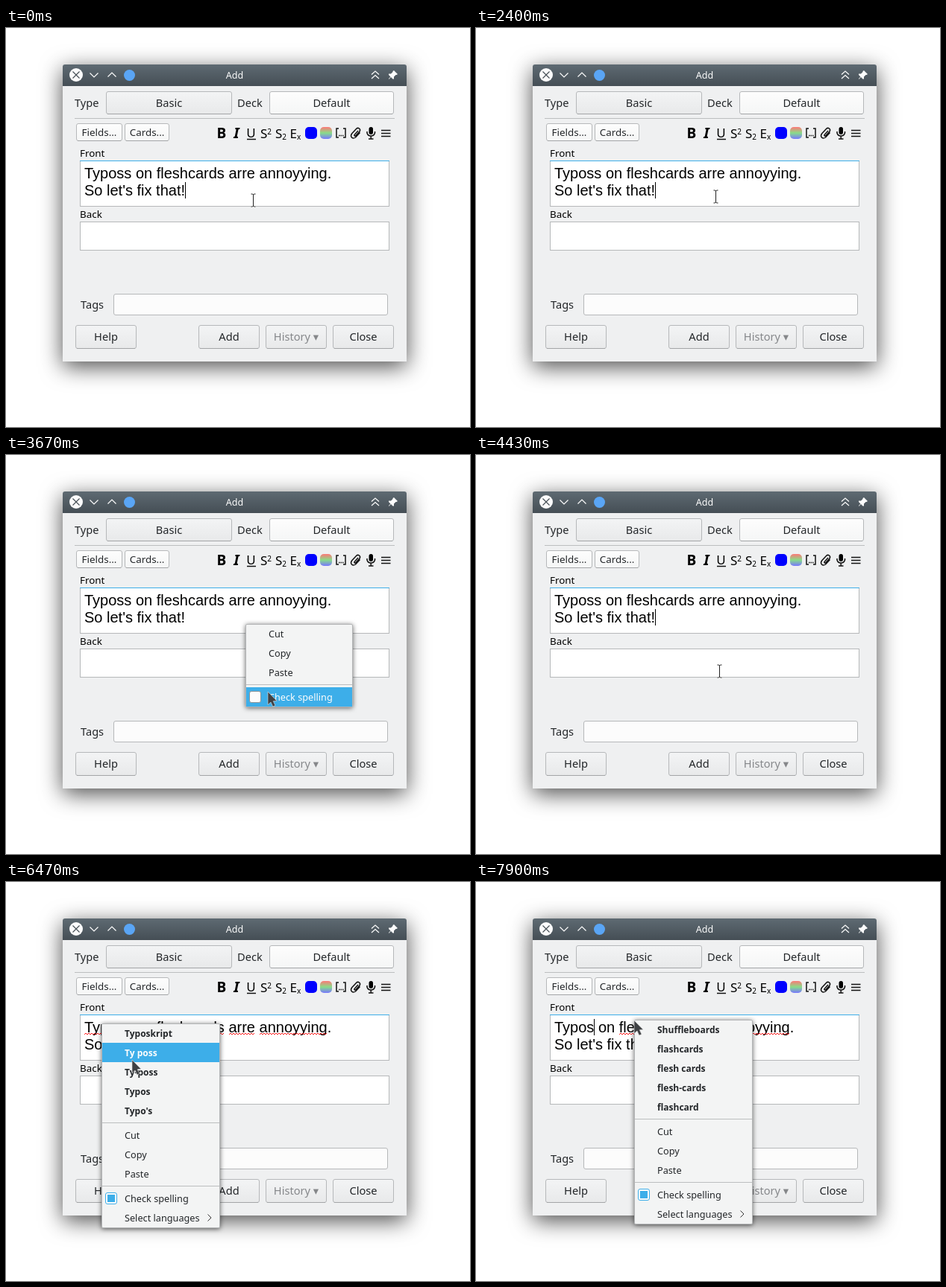
An HTML page that plays this animation: 622 px wide and 536 px high, repeating every 8 s.

```html
<!DOCTYPE html>
<html lang="en">
<head>
<meta charset="utf-8">
<title>Spell check</title>
<style>
html, body { margin: 0; width: 100%; height: 100%; overflow: hidden; background: #fff; }
svg { display: block; width: 622px; height: 536px; font: 14.6px "Noto Sans", "Open Sans", sans-serif; fill: #232629; }
.mid { text-anchor: middle; }
.small { font-size: 13.4px; }
.edit { font: 20px "Liberation Sans", Arial, sans-serif; fill: #000; white-space: pre; }
.line { fill: none; stroke: #111; stroke-width: 1.5; }
.bar { fill: none; stroke: #fcfcfc; stroke-width: 1.2; }
.menu { font-size: 12.7px; filter: drop-shadow(0 1px 3px rgba(0,0,0,.6)); }
.menu .bold { font-weight: 700; font-size: 12px; }
.menu .hover { fill: none; }
.menu .on .hover { fill: #3daee9; }
.menu .on text { fill: #fcfcfc; }
</style>
</head>
<body>
<svg viewBox="0 0 622 536">
  <defs>
    <linearGradient id="title" x2="0" y2="1"><stop stop-color="#5e6a72"/><stop offset="1" stop-color="#454e55"/></linearGradient>
    <linearGradient id="grey" x2="0" y2="1"><stop stop-color="#f3f4f5"/><stop offset="1" stop-color="#e8e9ea"/></linearGradient>
    <linearGradient id="light" x2="0" y2="1"><stop stop-color="#fdfdfd"/><stop offset="1" stop-color="#f5f6f6"/></linearGradient>
    <linearGradient id="rainbow" x2="0" y2="1"><stop stop-color="#f77"/><stop offset=".5" stop-color="#8d8"/><stop offset="1" stop-color="#77f"/></linearGradient>
    <clipPath id="sel"><rect id="sel1" y="184" height="23"/><rect id="sel2" y="206" height="23"/></clipPath>
  </defs>
  <path d="M76 448V52q0-3 3-3H534q3 0 3 3V448z" fill="#eff0f1" style="filter:drop-shadow(0 7px 15px rgba(0,0,0,.7))"/>
  <path d="M76 78V52q0-3 3-3H534q3 0 3 3V78z" fill="url(#title)"/>
  <circle cx="94" cy="63" r="9" fill="#fcfcfc"/>
  <path d="M89.500 58.500l9 9m0-9l-9 9" fill="none" stroke="#475057" stroke-width="1.2"/>
  <path class="bar" d="M112.500 60.500l5.500 5.500 5.500-5.500M136.500 65.500l5.500-5.500 5.500 5.500M490 62.500l5-4.500 5 4.500M490 68l5-4.500 5 4.500"/>
  <circle cx="165.500" cy="63.500" r="7.500" fill="#5aa5f5"/>
  <path d="M520 57l5 5-1.500 1-1 0-2.500 2.500 0 3-1.500 0-2.500-2.500-3 3 0-1 2.500-2.500-2.500-2.500 0-1.500 3 0 2.500-2.500 0-1z" fill="#fcfcfc"/>
  <text class="mid" x="306.500" y="68" style="font-size:12.5px;fill:#fcfcfc">Add</text>

  <text x="92" y="106">Type</text><text x="310" y="106">Deck</text>
  <path d="M92 121.500H521" stroke="#bcbebf"/>
  <g id="boxes"></g>

  <g fill="#000">
    <text class="mid" x="289" y="148" font-size="19" font-weight="700">B</text>
    <text class="mid" x="309" y="148" font-size="19" font-weight="700" font-style="italic">I</text>
    <text class="mid" x="328.500" y="147" font-size="17">U</text>
    <path class="line" d="M323 149.500H335"/>
    <text x="341" y="147.500" font-size="17">S<tspan font-size="10" dy="-5">2</tspan></text>
    <text x="361" y="147.500" font-size="17">S<tspan font-size="10" dy="2">2</tspan></text>
    <text x="380.500" y="147.500" font-size="17">E<tspan font-size="10" dy="2">x</tspan></text>
    <rect x="401" y="133" width="16" height="16" rx="5" fill="#00f"/>
    <rect x="421" y="133" width="16" height="16" rx="5" fill="url(#rainbow)"/>
    <path class="line" d="M446 135h-3v12h3M452 135h3v12h-3M446 144.500h1.500m1 0h1.500m1 0h1.500"/>
    <path class="line" d="M472 138l-5 5.500q-.5 2 1.500 1.500l5.500-6q1.500-2.500-.5-4t-4 .5l-6 6.500q-2 3 0 5t5 0l6-6.500"/>
    <rect x="486.500" y="133" width="5.500" height="10" rx="2.700"/>
    <path class="line" d="M484 139v2q1 4 5.200 4t5.300-4v-2M489.200 145v4M486 149h6.500M503 137.500h12.500m0 4h-12.500m0 4h12.500"/>
  </g>

  <g class="small">
    <text x="99" y="173" fill="#000">Front</text><text x="99" y="255" fill="#000">Back</text>
  </g>
  <path d="M99 178.500H514" stroke="#3daee9"/>
  <text x="100" y="377">Tags</text>

  <text class="edit first" x="105" y="202"></text>
  <text class="edit second" x="105" y="225">So let's fix that!</text>
  <path id="waves" fill="none" stroke="#f00" stroke-width=".9"/>
  <g clip-path="url(#sel)">
    <rect x="99" y="180" width="400" height="58" fill="#3390ff"/>
    <text class="edit first" x="105" y="202" style="fill:#fff"></text>
    <text class="edit second" x="105" y="225" style="fill:#fff">So let's fix that!</text>
  </g>
  <rect id="caret" width="1" height="22" fill="#000"/>
  <g id="menus"></g>
  <path id="arrow" d="M0 0V17.500L4 14 6.700 20 10 18.600 7.300 12.700 12 12.300z" fill="#3f4144" stroke="#ddd" stroke-width=".6"/>
  <g id="beam" fill="none">
    <path d="M-3-8.500H3M-3 8.500H3M0-8V8" stroke="#fff" stroke-width="2.500"/>
    <path d="M-3-8.500H-1L0-7.500 1-8.500H3M-3 8.500H-1L0 7.500 1 8.500H3M0-8V8" stroke="#222"/>
  </g>
</svg>
<script>
const $ = id => document.getElementById(id);
const all = s => [...document.querySelectorAll(s)];
const clamp = v => Math.max(0, Math.min(1, v));

const box = (x, y, w, h, fill, label = '', cls = '', ink = '#232629', r = 2.5) =>
  `<rect x="${x + .5}" y="${y + .5}" width="${w}" height="${h}" rx="${r}" fill="${fill}" stroke="#b6b8ba"/>` +
  (label && r ? `<path d="M${x + 2} ${y + h + .5}h${w - 3}" stroke="#a3a5a7"/>` : '') +
  `<text class="mid ${cls}" x="${x + w / 2 + .5}" y="${y + h / 2 + 5.5}" style="fill:${ink}">${label}</text>`;

$('boxes').innerHTML =
  box(134, 85, 168, 30, 'url(#grey)', 'Basic') + box(353, 85, 166, 30, 'url(#light)', 'Default') +
  box(94, 128, 61, 23, 'url(#light)', 'Fields...', 'small') + box(159, 128, 59, 23, 'url(#light)', 'Cards...', 'small') +
  box(99, 178, 414, 61, '#fff', '', '', '', 0) + box(99, 260, 414, 38, '#fff', '', '', '', 0) +
  box(144, 357, 367, 28, '#fcfcfc') +
  [[93, 'Help'], [258, 'Add'], [348, 'History ▾', '#85878a'], [438, 'Close']]
    .map(([x, s, ink]) => box(x, 399, 81, 31, 'url(#grey)', s, '', ink)).join('');

// Context menus: position, width, suggestions, opening and closing time
const menus = [
  [321, 227, 143, [], 2730, 3830],
  [128, 190, 158, ['Typoskript', 'Ty poss', 'Ty-poss', 'Typos', "Typo's"], 5770, 6700],
  [212, 185, 158, ['Shuffleboards', 'flashcards', 'flesh cards', 'flesh-cards', 'flashcard'], 7830, 9000]
].map(([x, y, w, words, open, close]) => {
  const full = words.length > 0, rows = [];
  let top = y, body = '';
  const add = (label, cls = '') => {
    body += `<g class="row"><rect class="hover" x="${x + 1}" y="${top}" width="${w - 1}" height="26"/>
      <text class="${cls}" x="${x + 31}" y="${top + 18}">${label}</text></g>`;
    rows.push(top);
    top += 26;
  };
  const split = () => {
    body += `<path d="M${x + 1} ${top + 3.5}h${w - 1}" stroke="#bcbebf"/>`;
    top += 7;
  };
  words.forEach(s => add(s, 'bold'));
  if (full) split();
  ['Cut', 'Copy', 'Paste'].forEach(s => add(s));
  split();
  body += '<g></g>';
  const cy = top + 13;
  add('Check spelling');
  body += `<rect x="${x + 5.5}" y="${cy - 7.5}" width="15" height="15" rx="2.5" fill="#fcfcfc" stroke="${full ? '#3daee9' : '#8d9496'}"/>`;
  if (full) {
    body += `<rect x="${x + 8}" y="${cy - 5}" width="10" height="10" fill="#3daee9"/>`;
    add('Select languages');
    body += `<path d="M${x + 142.5} ${top - 17.5}l4.500 4.500-4.500 4.500" fill="none" stroke="#333"/>`;
  }
  const el = document.createElementNS('http://www.w3.org/2000/svg', 'g');
  el.setAttribute('class', 'menu');
  el.innerHTML = `<rect x="${x + .5}" y="${y + .5}" width="${w}" height="${top - y}" rx="1.5" fill="#f3f4f4" stroke="#b3b5b6"/>` + body;
  $('menus').append(el);
  return { x, w, rows, open, close, el, items: [...el.querySelectorAll('.row')] };
});

// Pointer path: time, x, y
const path = [
  [0, 331, 231], [530, 331, 231], [567, 331, 229], [630, 331, 233], [670, 331, 231],
  [1000, 331, 231], [1233, 116, 203], [1360, 72, 198], [1500, 54, 195],
  [2030, 54, 195], [2130, 130, 203], [2300, 295, 222], [2400, 321, 226],
  [2730, 321, 227], [3270, 321, 227], [3420, 335, 262], [3667, 351, 318], [3760, 350, 325], [3900, 350, 322],
  [4330, 350, 322], [4500, 310, 270], [4700, 225, 214], [4930, 140, 193], [5070, 128, 190],
  [6270, 128, 190], [6467, 169, 239], [6640, 178, 282], [6730, 180, 280], [6930, 206, 200], [7030, 212, 185],
  [7830, 212, 186], [8000, 212, 186]
];
function pointer(t) {
  let i = path.findIndex(p => p[0] > t);
  if (i < 0) i = path.length - 1;
  const [a, b] = [path[i - 1], path[i]], k = (t - a[0]) / (b[0] - a[0]);
  return [a[1] + (b[1] - a[1]) * k, a[2] + (b[2] - a[2]) * k];
}

const firsts = all('.first'), second = all('.second')[0];
function setWord(word) {
  const s = word + ' on fleshcards arre annoyying.';
  if (firsts[0].textContent !== s) firsts.forEach(el => el.textContent = s);
}
setWord('Typoss');
const stops = el => [...el.textContent].map((_, i) => el.getStartPositionOfChar(i).x);
const near = (list, x) => list.reduce((a, b) => Math.abs(b - x) < Math.abs(a - x) ? b : a);
const stops1 = stops(firsts[0]), stops2 = [...stops(second), 240];

function select(el, from, to) {
  el.setAttribute('x', from);
  el.setAttribute('width', Math.max(0, to - from));
}
function wave([from, to]) {
  let d = `M${from} 205`;
  for (let x = from + 2, up = 1; x <= to; x += 2, up ^= 1) d += `L${x} ${up ? 203 : 205}`;
  return d;
}

function draw(t) {
  const [x, y] = pointer(t), fixed = t >= 6700;
  setWord(fixed ? 'Typos' : 'Typoss');

  // The selection trails the pointer by one step
  const dragging = t > 1000 && t < 2430;
  const [sx, sy] = pointer(Math.max(0, t - 33.4)), upper = sy < 206;
  const from2 = !dragging ? 240 : upper ? 105 : near(stops2, sx);
  select($('sel1'), dragging && upper ? near(stops1, sx) : 448, 448);
  select($('sel2'), from2, 240);

  const shift = fixed ? -10 : 0;
  const spans = [[202, 293], [299, 333], [340, 431]].map(s => s.map(v => v + shift));
  if (!fixed) spans.unshift([105, 168]);
  $('waves').setAttribute('d', t < 4600 ? '' : spans.map(wave).join(''));

  $('caret').setAttribute('x', fixed ? 158 : t < 4600 ? 240 : 246);
  $('caret').setAttribute('y', fixed ? 184 : 207);
  $('caret').style.display = from2 < 240 || (t > 2720 && t < 3850) ? 'none' : '';

  let open = false;
  for (const m of menus) {
    const shown = Math.min(clamp((t - m.open + 37) / 100), clamp((m.close + 100 - t) / 100));
    m.el.style.opacity = shown;
    m.el.style.display = shown ? '' : 'none';
    open ||= t >= m.open - 4 && t < m.close + 67;
    m.items.forEach((el, i) => el.classList.toggle('on',
      x > m.x + 2 && x < m.x + m.w && y >= m.rows[i] && y < m.rows[i] + 26));
  }

  const inField = x > 99 && x < 514 && (y > 178 && y < 240 || y > 260 && y < 299);
  const beam = !open && (inField || dragging);
  $('beam').style.display = beam ? '' : 'none';
  $('arrow').style.display = beam ? 'none' : '';
  $('beam').setAttribute('transform', `translate(${Math.round(x) + .5} ${Math.round(y) + .5})`);
  $('arrow').setAttribute('transform', `translate(${Math.round(x)} ${Math.round(y)})`);
}

function tick() {
  const t = performance.now() % 8000, step = 100 / 3;
  draw(Math.min(7999, Math.floor((t + 3.4) / step) * step));
  requestAnimationFrame(tick);
}
tick();
</script>
</body>
</html>
```
